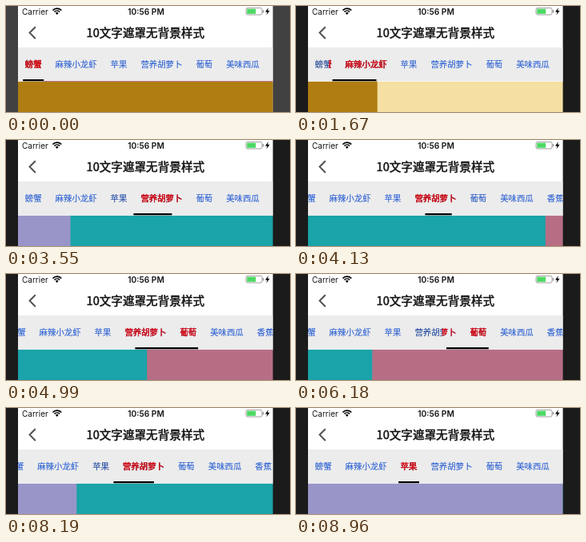
Recreate the animation shown at these times as an HTML page with a canvas. Size 355 px wide and 133 px high, loop 9.14 s.

```html
<!DOCTYPE html>
<html lang="zh-CN">
<head>
<meta charset="utf-8">
<title>文字遮罩</title>
<style>
html, body { margin: 0; width: 100%; height: 100%; overflow: hidden; background: #1b1b1b; }
canvas { display: block; width: 355px; height: 133px; }
</style>
</head>
<body>
<canvas id="stage"></canvas>
<script>
const W = 355, H = 133, LOOP = 9140;
const LEFT = 15, RIGHT = 333.6, PAGE = RIGHT - LEFT;
const BAR_TOP = 52, BAR_BOTTOM = 94.6;
const EM = 10.4, GAP = 17, LINE = 26;
const CJK = '"Noto Sans CJK SC", "Noto Sans CJK", sans-serif';
const LATIN = 'Inter, "Liberation Sans", sans-serif';

const canvas = document.getElementById('stage');
const ctx = canvas.getContext('2d');
const dpr = window.devicePixelRatio || 1;
canvas.width = W * dpr;
canvas.height = H * dpr;

const pages = ['#b07d12', '#f5dfa3', '#9a95c9', '#1aa3a8', '#b76e84'];

let nextX = 23.8;
const tabs = ['螃蟹', '麻辣小龙虾', '苹果', '营养胡萝卜', '葡萄', '美味西瓜', '香蕉', '香甜菠萝'].map(name => {
  const w = name.length * EM, tab = { name, x: nextX, w, mid: nextX + w / 2 };
  nextX += w + GAP;
  return tab;
});

const linear = u => u;
const drag = u => 1 - (1 - u) ** 2;
const settle = u => 1 - (1 - u) ** 3;
const glide = u => u < 0.5 ? 2 * u * u : 1 - 2 * (1 - u) ** 2;

// Screen refreshes: first, last, count
const bursts = [
  [1200, 1380, 4], [1620, 1960, 7], [2250, 2310, 2], [2610, 2900, 6],
  [3080, 3190, 3], [3490, 4360, 16], [4410, 5110, 13], [5700, 5880, 4],
  [6180, 6710, 10], [7000, 7120, 3], [7480, 8370, 16], [8430, 8960, 10]
];

// Moves: start, end, value reached, easing
const swipes = [
  [1150, 1380, 0.29, linear], [1570, 1960, 1, settle],
  [2200, 2310, 1.39, linear], [2565, 2871, 2, settle],
  [3030, 3190, 2.4, linear], [3440, 3800, 3, settle],
  [4053, 5110, 3.5, drag], [5650, 5880, 3.58, linear],
  [6130, 6449, 4, settle], [6950, 7120, 3.705, linear],
  [7430, 7880, 3, settle], [8097, 8370, 2.6, drag],
  [8380, 8700, 2, settle]
];
const scrolls = [
  [3780, 4090, 20, glide], [6420, 6710, 73.4, glide],
  [7900, 8244, 20, glide], [8680, 8960, 0, glide]
];

function snap(t) {
  let last = 0;
  for (const [a, b, n] of bursts) {
    if (t < a) break;
    const step = (b - a) / (n - 1);
    last = a + step * Math.min(n - 1, Math.floor((t - a + 6) / step));
  }
  return last;
}

function valueAt(moves, t) {
  let v = 0;
  for (const [a, b, to, ease] of moves) {
    if (t <= a) break;
    v += (to - v) * ease(Math.min(1, (t - a) / (b - a)));
  }
  return v;
}

// Stretch from one span to the next, then let the tail catch up
function stretch(a, b, u) {
  const lead = Math.min(1, u * 2), tail = Math.max(0, u * 2 - 1);
  const left = a[0] + (b[0] - a[0]) * tail;
  const right = a[1] + (b[1] - a[1]) * lead;
  return [left, right - left];
}

function rect(x, y, w, h, color) {
  ctx.fillStyle = color;
  ctx.fillRect(x, y, w, h);
}

// A thin outline gives weights between regular and bold
function label(str, x, y, font, color, align = 'left', outline = 0) {
  ctx.font = font;
  ctx.fillStyle = ctx.strokeStyle = color;
  ctx.textAlign = align;
  ctx.fillText(str, x, y);
  if (!outline) return;
  ctx.lineWidth = outline;
  ctx.lineJoin = 'round';
  ctx.strokeText(str, x, y);
  ctx.lineJoin = 'miter';
}

function clipped(x, y, w, h, draw) {
  ctx.save();
  ctx.beginPath();
  ctx.rect(x, y, w, h);
  ctx.clip();
  draw();
  ctx.restore();
}

function statusBar() {
  label('Carrier', 20, 10.5, `10px ${LATIN}`, '#111');
  label('10:56 PM', 175, 10.5, `600 10.2px ${LATIN}`, '#111', 'center');

  ctx.strokeStyle = '#000';
  ctx.lineWidth = 1.7;
  for (const r of [4.6, 7.4]) {
    ctx.beginPath();
    ctx.arc(63.8, 10.6, r, -Math.PI * 0.76, -Math.PI * 0.24);
    ctx.stroke();
  }
  ctx.fillStyle = '#000';
  ctx.beginPath();
  ctx.moveTo(63.8, 11);
  ctx.arc(63.8, 10.6, 2.6, -Math.PI * 0.76, -Math.PI * 0.24);
  ctx.fill();

  ctx.strokeStyle = '#8a8a8a';
  ctx.lineWidth = 0.8;
  ctx.beginPath();
  ctx.roundRect(300, 2.4, 20, 8.6, 2);
  ctx.stroke();
  rect(301.2, 3.6, 11, 6.2, '#4cd964');
  rect(320.8, 5, 1.2, 3.4, '#8a8a8a');

  ctx.fillStyle = '#000';
  ctx.beginPath();
  [[328, 2], [324, 7.4], [326.6, 7.4], [325.4, 11.4], [329.6, 5.8], [327, 5.8]]
    .forEach(([x, y]) => ctx.lineTo(x, y));
  ctx.fill();
}

function navBar() {
  ctx.strokeStyle = '#505050';
  ctx.lineWidth = 2;
  ctx.beginPath();
  ctx.moveTo(36.8, 26.2);
  ctx.lineTo(29.6, 33.6);
  ctx.lineTo(36.8, 41);
  ctx.stroke();
  label('10文字遮罩无背景样式', 174.3, 39.2, `14.6px ${CJK}`, '#111', 'center', 0.5);
}

function tabText(color, outline) {
  tabs.forEach((tab, i) => label(tab.name, tab.x, 77.4, `${EM}px ${CJK}`, color(i), 'left', outline));
}

function tabBar(p, scroll) {
  const i = Math.min(Math.floor(p), tabs.length - 2), u = p - i;
  const a = tabs[i], b = tabs[i + 1];
  const [mx, mw] = stretch([a.x, a.x + a.w], [b.x, b.x + b.w], u);
  const [lx, lw] = stretch([a.mid - LINE / 2, a.mid + LINE / 2], [b.mid - LINE / 2, b.mid + LINE / 2], u);
  const base = k => {
    const d = Math.min(1, Math.abs(p - k));
    return `rgb(${[48, 100, 212].map(c => Math.round(c * d)).join()})`;
  };

  rect(LEFT, BAR_TOP, PAGE, BAR_BOTTOM - BAR_TOP, '#ececec');
  ctx.translate(-scroll, 0);
  tabText(base, 0.15);
  clipped(mx, BAR_TOP, mw, 40, () => tabText(() => '#dc1420', 0.4));
  rect(lx, 92, lw, 2.6, '#000');
}

function draw(now) {
  const raw = now % LOOP, t = snap(raw);
  const p = valueAt(swipes, t), scroll = valueAt(scrolls, t);

  ctx.setTransform(dpr, 0, 0, dpr, 0, 0);
  rect(0, 0, W, H, raw < 1200 ? '#414141' : '#1b1b1b');
  rect(LEFT, 0, PAGE, BAR_BOTTOM + 1, '#fff');
  statusBar();
  navBar();

  clipped(LEFT, BAR_BOTTOM, PAGE, H - BAR_BOTTOM, () => {
    pages.forEach((c, i) => rect(LEFT + (i - p) * PAGE, BAR_BOTTOM, PAGE + 1, H - BAR_BOTTOM, c));
  });
  clipped(LEFT, BAR_TOP, PAGE, BAR_BOTTOM - BAR_TOP, () => tabBar(p, scroll));
  if (raw < 1200) rect(47, 94, RIGHT - 47, 1, '#b9748f');
}

function loop() {
  draw(performance.now());
  requestAnimationFrame(loop);
}
loop();
</script>
</body>
</html>
```
